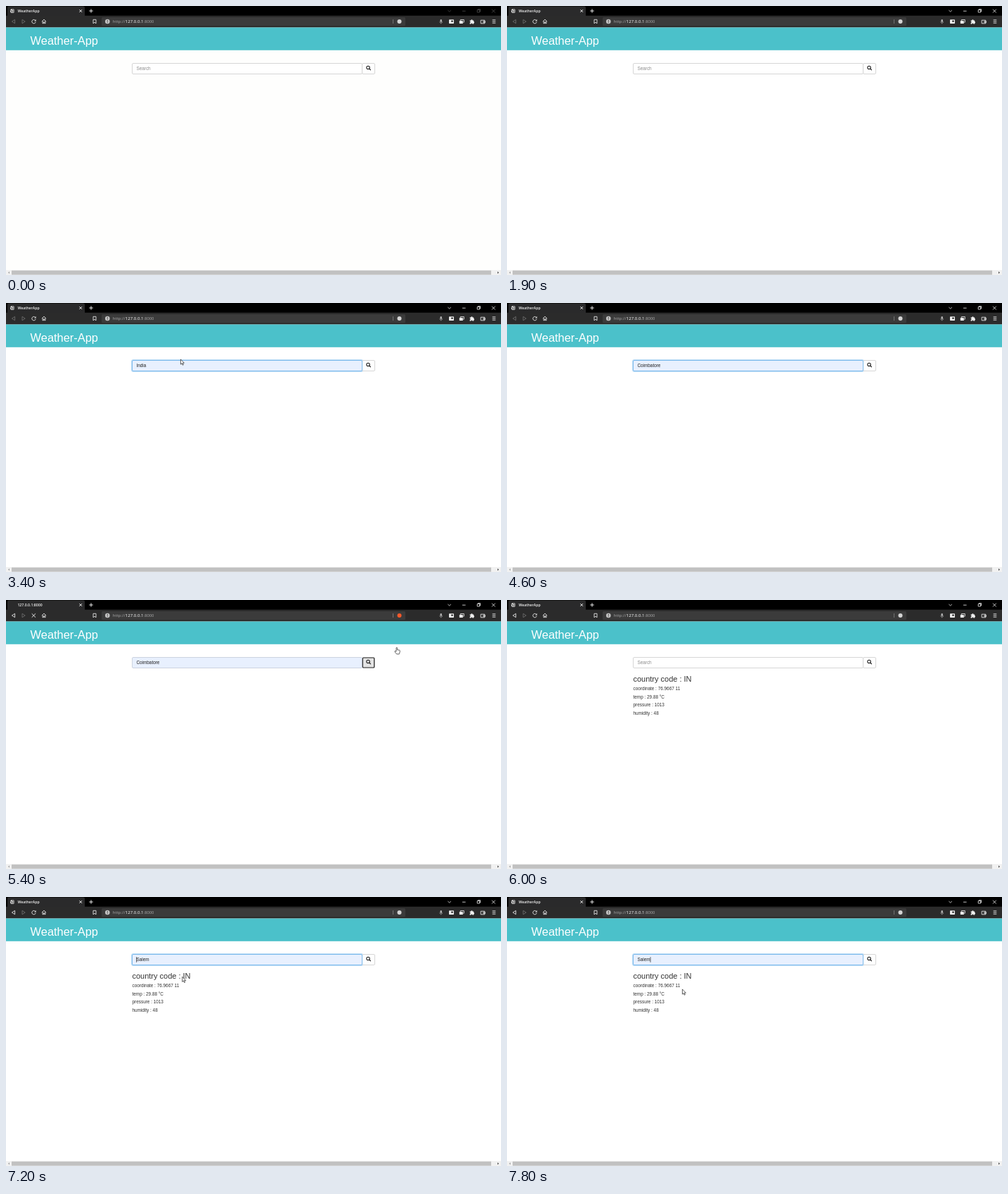
Animation of 704x382 px, one loop 8000 ms. Source, as an HTML page:

```html
<!DOCTYPE html>
<html lang="en">
<head>
<meta charset="utf-8">
<title>Weather-App</title>
<style>
html, body { margin: 0; width: 100%; height: 100%; overflow: hidden; background: #fff; }
svg { display: block; width: 704px; height: 382px; }
.page { font-family: "Liberation Sans", Arial, sans-serif; }
.ui { font-family: "Open Sans", "Noto Sans", sans-serif; }
.line { fill: none; stroke: #e4e4e4; stroke-width: .9; }
.small { font-size: 6.4px; fill: #333; }
</style>
</head>
<body>
<svg viewBox="0 0 704 382" xmlns="http://www.w3.org/2000/svg">
  <rect id="paper" width="704" height="382" fill="#fff"/>

  <!-- browser frame -->
  <g class="ui">
    <rect width="704" height="14" fill="#000"/>
    <path d="M2 14V2.5Q2 .5 4 .5H110Q112 .5 112 2.5V14Z" fill="#2a2a2b"/>
    <rect y="13.7" width="704" height="16.8" fill="#2b2b2b"/>
    <g id="globe">
      <circle cx="9" cy="7" r="3.1" fill="#d6d6d6"/>
      <path d="M6.4 6.2L8.6 7.2 8 9.3M9.2 4.2L9.6 5.8 11.8 6.2M9.8 9.4L10.4 7.8 11.8 7.6" fill="none" stroke="#333" stroke-width=".9"/>
    </g>
    <text id="tab" x="16.4" y="9" font-size="5.2" font-weight="600" fill="#f2f2f2"></text>
    <path class="line" d="M104.4 5.2l3.6 3.6m0-3.6l-3.6 3.6M118.3 7h5.4M121 4.3v5.4" style="stroke:#fff"/>
    <g id="controls" class="line" style="stroke:#fff;stroke-width:.8">
      <path d="M628.4 6l2.2 2.1L632.8 6M649 7.2h4.6M691 4.7l4.8 4.8m0-4.8l-4.8 4.8"/>
      <path d="M670.2 5.6h3.4v3.4h-3.4zM671.3 5.4v-.8h3.3v3.3h-.8"/>
    </g>

    <path id="back" class="line" d="M12.6 19.3v5.4L8.4 22z"/>
    <path class="line" d="M23 19.3v5.4L27.2 22z" style="stroke:#6b6b6b"/>
    <g id="reload">
      <path class="line" d="M41.6 20.3A2.7 2.7 0 1 0 42.2 22.7" style="stroke-width:1"/>
      <path d="M42.7 18.9v2.7H40z" fill="#e4e4e4"/>
    </g>
    <path id="stop" class="line" d="M36.7 19.3l5.4 5.4m0-5.4l-5.4 5.4" style="stroke-width:1"/>
    <path class="line" d="M51 22l3-2.9L57 22M52 21.4v3.3h1.4v-1.9h1.3v1.9H56v-3.3"/>
    <path class="line" d="M124 19.3h4v5.5l-2-1.6-2 1.6z"/>
    <rect x="136" y="16" width="432" height="12.3" rx="1.5" fill="#3b3b3b"/>
    <circle cx="144.3" cy="22" r="3.3" fill="#c4c4c4"/>
    <path d="M144.3 20v2.4m0 .7v.9" stroke="#3b3b3b" stroke-width=".9"/>
    <g font-size="6.1" fill="#a9a9a9">
      <text x="151.8" y="24.3">http://</text>
      <text x="169.8" y="24.3" fill="#fff">127.0.0.1</text>
      <text x="195.6" y="24.3" font-size="5.8">:8000</text>
    </g>
    <path d="M550.5 19v6" stroke="#8a8a8a" stroke-width=".7"/>
    <circle id="badge" cx="559.5" cy="22.1" r="3"/>

    <rect x="617.5" y="19" width="2.4" height="4" rx="1.2" fill="#b5b5b5"/>
    <path class="line" d="M616.7 22.2q0 1.9 2 1.9t2-1.9M618.7 24v1.3" style="stroke:#b5b5b5;stroke-width:.6"/>
    <rect x="630" y="19.3" width="7" height="5.7" rx=".8" fill="#ededed"/>
    <rect x="633.2" y="20.6" width="2.6" height="2" fill="#222"/>
    <path class="line" d="M646.3 20.9v-1.4h5v3.6h-1.2"/>
    <rect x="644.8" y="21" width="5" height="4" rx=".6" fill="#ededed"/>
    <path d="M659.6 20.4h1.6a1.2 1.2 0 0 1 2.4 0h1.6v1.7a1.2 1.2 0 0 1 0 2.3v1h-1.8a1 1 0 0 0-2 0h-1.8v-1.6a1 1 0 0 0 0-2z" fill="#f0f0f0"/>
    <path class="line" d="M675.2 20.2h5.6v4.6h-5.6zM678.8 21.7h2.6v1.7h-2.6z"/>
    <path class="line" d="M691.7 19.8h4.6m-4.6 2.2h4.6m-4.6 2.2h4.6"/>
  </g>

  <!-- web page -->
  <g class="page">
    <rect y="30.5" width="704" height="32.3" fill="#4bc1ca"/>
    <text x="34.6" y="54.8" font-size="16.4" fill="#fff">Weather-App</text>
    <rect id="glow" x="179.3" y="81.2" width="327.6" height="15.6" rx="1.8" fill="none" stroke="#66afe9" stroke-width="2.6"/>
    <rect x="506.5" y="81.5" width="18" height="15" rx="1.5" fill="#fff" stroke="#ccc" stroke-width=".8"/>
    <rect id="field" x="179.5" y="81.5" width="327" height="15" rx="1.5" stroke-width=".8"/>
    <rect id="press" x="507.3" y="82" width="16.4" height="14" rx="1.3" fill="#e3e3e3" stroke="#2d2d2d" stroke-width="1.2"/>
    <circle cx="515" cy="87.4" r="2.2" fill="none" stroke="#222" stroke-width="1.1"/>
    <path d="M516.6 89l2.1 2.1" stroke="#222" stroke-width="1.3"/>
    <text id="query" x="185.4" y="91.1" font-size="6.4"></text>
    <path id="caret" stroke="#222" stroke-width=".7"/>
    <g id="result">
      <text x="179.4" y="116" font-size="11" fill="#333">country code : IN</text>
      <text class="small" x="179.5" y="128.1">coordinate : 76.9667 11</text>
      <text class="small" x="179.5" y="139.7">temp : 29.88 °C</text>
      <text class="small" x="179.5" y="151.3">pressure : 1013</text>
      <text class="small" x="179.5" y="162.8">humidity : 48</text>
    </g>
  </g>

  <!-- scrollbar -->
  <rect y="375" width="704" height="7" fill="#f1f1f1"/>
  <rect x="8" y="375.6" width="682" height="6" fill="#c1c1c1"/>
  <path d="M5 377l-2 1.6 2 1.6z" fill="#a3a3a3"/>
  <path d="M699 377l2 1.6-2 1.6z" fill="#505050"/>

  <path id="arrow" d="M.4 .4V7.6L2 6.1 3.2 8.7 4.4 8.2 3.2 5.7H5.4Z" fill="#fff" stroke="#222" stroke-width=".7"/>
  <path id="hand" d="M3 6V1.2q0-.8.7-.8t.7.8v2.5l3 .5q1 .2.9 1.3L7.8 8.2 7.2 9.8H3.7L1 6.6q-.5-.8.2-1.1T3 6.2Z" fill="#fff" stroke="#222" stroke-width=".7"/>
</svg>
<script>
const LOOP = 8000, STEP = 100;
const el = id => document.getElementById(id);
const set = (id, attrs) => {
  for (const k in attrs) el(id).setAttribute(k, attrs[k]);
};
const show = (id, on) => set(id, { visibility: on ? "visible" : "hidden" });

// pointer strokes: end time, then [time, x, y] points
const arrowMoves = [
  { end: 1800, points: [[1300, 441, 320], [1500, 346, 134], [1600, 337, 117], [1700, 333, 98]] },
  { end: 4300, points: [[3100, 250, 74], [3400, 248, 79.5], [4000, 248, 79.5], [4200, 272, 103]] },
  { end: LOOP, points: [[7100, 251, 104], [7400, 249, 130.5]] }
];
const handMoves = [{ end: 6000, points: [[4700, 517, 83], [4800, 552, 67]] }];
const carets = [[2600, 3100, 185.6], [4300, 4600, 218.8], [6600, 7600, 185.6], [7800, LOOP, 204]];
const words = [[0, ""], [3200, "India"], [3600, "Coimbatore"], [5500, ""], [7100, "Salem"]];

const between = (t, a, b) => t >= a && t < b;
const latest = (list, t) => list.filter(p => p[0] <= t).pop();

function place(id, moves, t) {
  const move = moves.find(m => between(t, m.points[0][0], m.end));
  show(id, move);
  if (!move) return;
  const a = latest(move.points, t);
  const b = move.points.find(p => p[0] > t) || a;
  const k = a === b ? 0 : (t - a[0]) / (b[0] - a[0]);
  const at = i => a[i] + (b[i] - a[i]) * k;
  set(id, { transform: `translate(${at(1)} ${at(2)})` });
}

function focusLevel(t) {
  if (t < 2500 || between(t, 5200, 6600)) return 0;
  return [2500, 5100, 6600].includes(t) ? 0.5 : 1;
}

function draw(now) {
  const t = Math.floor((now % LOOP) / STEP) * STEP;
  const loading = between(t, 5200, 5500);
  const focus = focusLevel(t);
  const word = latest(words, t)[1];

  set("paper", { fill: t < 500 ? "#fefefd" : "#fff" });
  set("controls", { opacity: t < 900 ? 0.3 : t < 1000 ? 0.65 : 0.95 });
  set("back", { style: `stroke:${t < 5200 ? "#6b6b6b" : "#e4e4e4"}` });
  set("badge", { fill: loading ? "#f4592b" : "#d4d4d4" });
  el("tab").textContent = loading ? "127.0.0.1:8000" : "WeatherApp";
  show("globe", !loading);
  show("reload", !loading);
  show("stop", loading);

  set("glow", { opacity: focus * 0.4 });
  set("field", {
    fill: word ? "#e8f0fe" : "#fff",
    stroke: focus ? "#66afe9" : word ? "#c3cbd8" : "#ccc"
  });
  show("press", between(t, 5100, 5500));
  el("query").textContent = word || "Search";
  set("query", { fill: word ? "#222" : "#8b8b8b" });
  show("result", t >= 5500);

  const caret = carets.find(c => between(t, c[0], c[1]));
  show("caret", caret);
  if (caret) set("caret", { d: `M${caret[2]} 85.2v7.6` });

  place("arrow", arrowMoves, t);
  place("hand", handMoves, t);
}

const start = performance.now();
function tick() {
  draw(performance.now() - start);
  requestAnimationFrame(tick);
}
tick();
</script>
</body>
</html>
```
